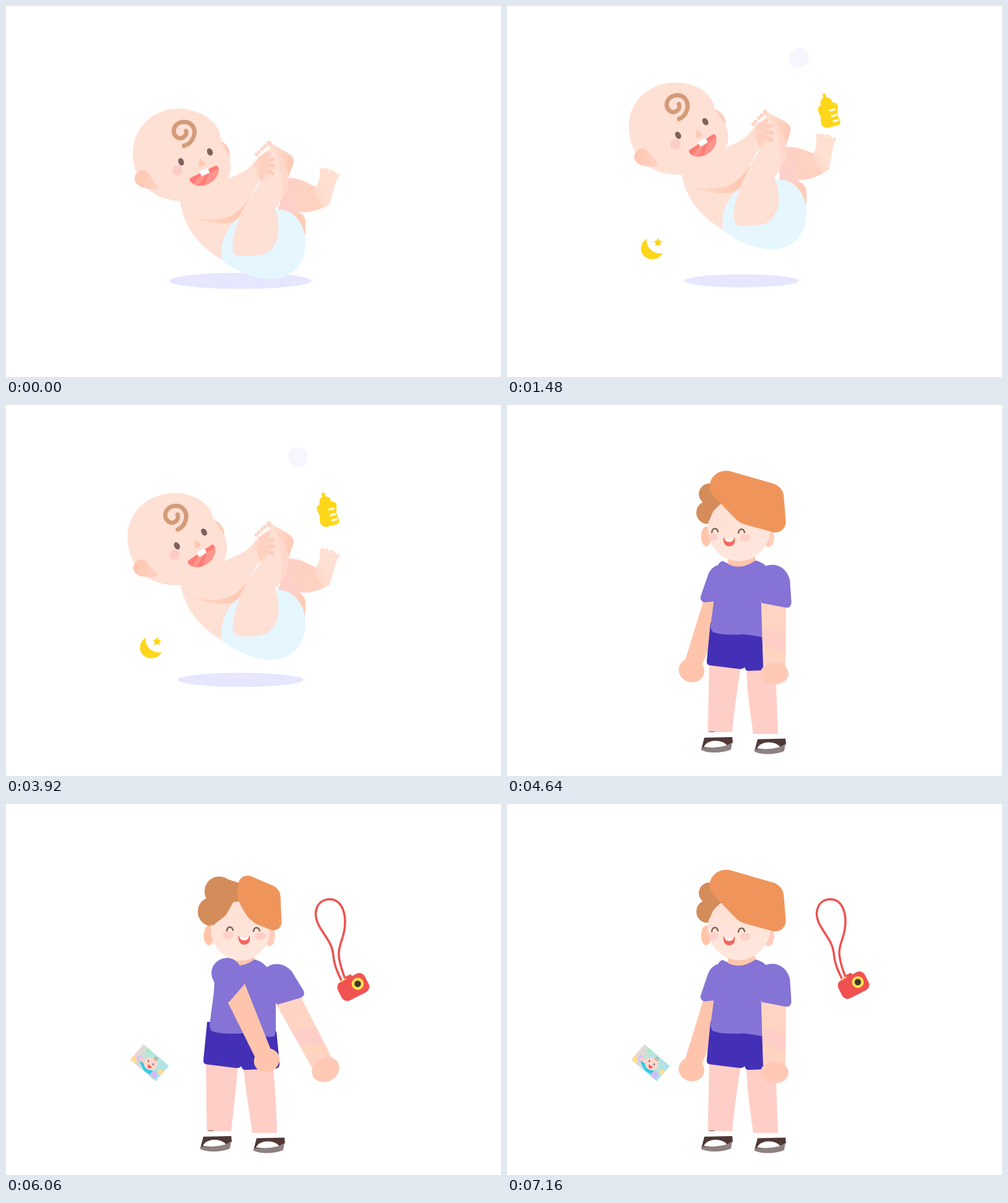
These frames come from a looping animation (800 by 600 pixels, 7.18 s). An HTML page with a canvas:

```html
<!DOCTYPE html>
<html lang="en">
<head>
<meta charset="utf-8">
<title>Growing up</title>
<style>
html, body { margin: 0; width: 100%; height: 100%; overflow: hidden; background: #fff; }
canvas { display: block; width: 800px; height: 600px; }
</style>
</head>
<body>
<canvas id="stage" width="800" height="600"></canvas>
<script>
const ctx = document.getElementById('stage').getContext('2d');
const LOOP = 7180, SWITCH = 4500, TAU = Math.PI * 2;
const SKIN = '#ffe0d5', PEACH = '#ffccb8', YELLOW = '#ffd619';

const clamp = v => Math.max(0, Math.min(1, v));
const mix = (a, b, k) => a + (b - a) * k;
const smooth = v => { v = clamp(v); return v * v * (3 - 2 * v); };
const wave = (t, period) => (1 - Math.cos(TAU * t / period)) / 2;
const bump = (t, mid, half) => {
  const d = Math.abs(t - mid) / half;
  return d < 1 ? (1 + Math.cos(Math.PI * d)) / 2 : 0;
};

function fill(d, color) {
  ctx.fillStyle = color;
  ctx.fill(new Path2D(d));
}
function line(d, color, width) {
  ctx.strokeStyle = color;
  ctx.lineWidth = width;
  ctx.lineCap = ctx.lineJoin = 'round';
  ctx.stroke(new Path2D(d));
}
function oval(x, y, rx, ry, color, turn = 0) {
  ctx.fillStyle = color;
  ctx.beginPath();
  ctx.ellipse(x, y, rx, ry, turn, 0, TAU);
  ctx.fill();
}
function box(x, y, w, h, r, color) {
  ctx.fillStyle = color;
  ctx.beginPath();
  ctx.roundRect(x, y, w, h, r);
  ctx.fill();
}
function blend(x0, y0, x1, y1, ...colors) {
  const g = ctx.createLinearGradient(x0, y0, x1, y1);
  colors.forEach((c, i) => g.addColorStop(i / (colors.length - 1), c));
  return g;
}
function group(draw, dx = 0, dy = 0) {
  ctx.save();
  ctx.translate(dx, dy);
  draw();
  ctx.restore();
}
// Rotate (degrees) and scale around a point.
function about(x, y, deg, scale, draw) {
  ctx.save();
  ctx.translate(x, y);
  ctx.rotate(deg * Math.PI / 180);
  ctx.scale(scale, scale);
  ctx.translate(-x, -y);
  draw();
  ctx.restore();
}

// ---------- baby ----------
function farLeg() {
  fill('M440 290L455 278C472 277 488 286 503 294L524 320C505 332 485 336 466 332L445 345Z', blend(440, 310, 500, 310, '#ffcfc8', '#ffd2c0'));
  fill('M508 266L538 274C532 285 529 303 524 317C521 324 515 325 511 323L497 299C504 290 508 280 508 266Z', blend(500, 312, 520, 302, '#ffd8c8', '#ffe0d2'));
  [[511, 266, 4], [518, 266.5, 3.4], [525, 268, 3.1], [530, 271, 2.8], [536, 274, 2.7]]
    .forEach(([x, y, r]) => oval(x, y, r, r + .8, '#ffdfd0', .3));
}
function torso() {
  fill('M468 332C485 336 487 346 482 378L450 350Z', '#ffcdb8');
  fill('M440 325L458 302Q468 320 473 336L440 340Z', '#ffcfca');
  fill('M281 310C285 352 306 386 352 412L385 360L397 308L350 296Z', SKIN);
  fill('M297 338C318 351 350 355 372 348L394 310L388 308C378 336 340 346 297 338Z', blend(300, 345, 385, 325, '#ffd9ca', '#ffc7ae'));
  fill('M348 395C350 370 362 354 373 345L436 329C465 327 484 352 484 385C483 420 460 442 428 442C400 442 365 425 349 411Q348 403 348 395Z', '#e5f6ff');
}
function nearLeg() {
  fill('M424 221Q428 219 432 224C446 233 460 238 464 246C467 254 461 262 456 279L436 262Z', blend(430, 240, 465, 250, '#ffdccf', '#ffc8b4'));
  fill('M412 283C400 304 372 342 367 380C365 398 368 404 382 404C402 405 420 403 427 395C441 382 441 366 440 350Q439 338 435 329C451 306 458 294 456 272C452 258 442 242 432 227L412 240Z', SKIN);
  fill('M433 229C447 245 457 262 456 278Q455 292 446 311C448 280 444 255 433 229Z', '#ffd8cb');
  [[425, 222, 4], [419, 227, 3.5], [414, 231, 3], [409, 236, 3], [405, 240, 3]]
    .forEach(([x, y, r]) => oval(x, y, r, r, '#ffd6c8'));
}
function arm() {
  fill('M281 316L356 281C374 272 388 268 395 259L410 243L414 281C407 286 403 294 400 301C388 321 374 338 352 343C330 347 308 345 290 335Z', SKIN);
  const tone = blend(404, 255, 436, 262, '#ffd5c6', '#ffc9b7');
  fill('M397 261L409 243Q423 236 428 248Q437 259 427 271L413 283C406 280 409 262 397 261Z', blend(396, 258, 428, 262, SKIN, '#ffd0bf', '#ffdacd'));
  line('M411 251Q417 240 425 239M414 256Q422 247 432 248M416 263Q424 256 433 259M416 269Q424 264 431 271', tone, 5.5);
}
function babyHead() {
  fill('M344 218C355 219 365 234 361 247L349 242Z', PEACH);
  fill('M278 166C310 166 345 184 347 215C350 229 361 235 363 255C366 284 340 316 287 316C242 315 205 290 205 238C206 195 237 167 278 166Z', SKIN);
  fill('M226 266C216 263 207 272 208 281C210 292 225 296 240 297C247 296 245 289 241 287C235 280 232 270 226 266Z', blend(209, 275, 243, 290, '#ffc7b0', '#ffd1c1'));
  line('M291 202C293 211 283 217 276 212C266 204 272 188 287 187.5C301 187 308 200 303 212Q298 224 288 226', '#d49b78', 7);
  oval(283, 252, 4.4, 6.2, '#80605a', -.4);
  oval(329.5, 236, 4.4, 6.2, '#80605a', -.4);
  fill('M313 246Q315 246 322 256Q320 259 311 260Z', '#ffc9b0');
  oval(277, 266, 8.2, 8.2, '#ffcbc7');
  const mouth = 'M298 278L339 258C344 257 345 265 342 273C333 291 309 296 299 285Q295 281 298 278Z';
  fill(mouth, '#ff7d76');
  group(() => {
    ctx.clip(new Path2D(mouth));
    fill('M317 296L329 270L345 262L337 285ZM300 291L316 272L326 270L308 292Z', '#ff958d');
  });
  group(() => { ctx.rotate(-.4); box(-7.2, -4.2, 14.5, 8.5, 2, '#fff'); }, 321, 268.5);
}
function bottle() {
  line('M511 139L513 147', YELLOW, 6);
  oval(515, 154, 11.5, 11, YELLOW);
  fill('M499 165Q500 160 507 158L528 153Q536 154 537 160C538 168 535 172 538 180L542 190Q543 196 537 198L517 203Q508 203 505 195L504 182C503 175 498 172 499 165Z', YELLOW);
  line('M523 169L531 167M526 180L534 178M529 190L537 188', '#fff', 4);
}
function moon() {
  fill('M224 373C205 385 212 413 235 413C245 413 252 408 255 401C238 405 222 390 224 373Z', YELLOW);
  ctx.beginPath();
  for (let i = 0; i < 10; i++) {
    const a = i * Math.PI / 5 - Math.PI / 2, r = i % 2 ? 4.2 : 8;
    ctx.lineTo(246 + r * Math.cos(a), 380.5 + r * Math.sin(a));
  }
  ctx.closePath();
  ctx.fillStyle = ctx.strokeStyle = YELLOW;
  ctx.lineWidth = 1;
  ctx.lineJoin = 'round';
  ctx.fill();
  ctx.stroke();
}
function babyScene(t) {
  const up = wave(t, 3045);
  oval(379, 444.5, mix(115, 93, up), mix(13, 10.5, up), '#e6e6ff');
  if (t > 800) {
    const pop = t < 1080 ? 1.08 * smooth((t - 800) / 280) : mix(1.08, .83, smooth((t - 1080) / 340));
    const size = pop + .17 * bump(t, 2880, 1000);
    const r = 16 * smooth((t - 800) / 280);
    oval(472, 84, r, r, '#f6f6ff');
    about(520.5, 169, 0, size, bottle);
    about(234, 392.5, 0, size, moon);
  }
  const pull = -2.8 * wave(t, 965);
  group(() => {
    about(440, 340, -7 * wave(t, 3920), 1, farLeg);
    torso();
    about(390, 385, pull, 1, nearLeg);
    about(310, 340, pull, 1, arm);
    about(321, 303, -8.2 * wave(t, 2530), 1, babyHead);
  }, 0, -48.5 * up);
}

// ---------- boy ----------
function shoe() {
  fill('M319 538L364 537L365 546L355 554L314 557Z', '#4f3835');
  fill('M318 553C324 540 348 540 356 551Q338 556 318 553Z', '#fff');
  fill('M314 554C332 555 355 554 364 545L362 557C350 563 325 564 314 558Z', '#8e8181');
}
function leftArm() {
  fill('M-19 26L19 26L13 145L-15 145Z', '#ffc5ac');
  oval(0, 154, 21, 19, '#ffc5ac');
  fill('M-25 0C-25 -34 24 -34 24 0L18 27L-16 43Q-26 43 -25 32Z', '#8573d6');
}
function rightArm(stretch) {
  group(() => {
    ctx.scale(1, stretch);
    fill('M-20 30L20.5 30L18 148L-18 148Z', '#ffd4c4');
    fill('M-19 82L19 95L18 126L-18.5 105Z', '#ffcec8');
    fill('M-18.5 110L18 125L18 138L-18 122Z', '#ffd5bd');
    oval(0, 159, 23, 18.5, '#ffc9b6');
  });
  fill('M-30 -10C-14 -30 18 -32 27 0L29 37Q28 46 20 45L-19 37Z', '#8573d6');
}
function place(draw, x, y, deg) {
  group(() => { ctx.rotate(-deg * Math.PI / 180); draw(); }, x, y);
}
// Each point: x, y facing left, then x, y facing right.
function morph(points, h) {
  return points.map(([a, b, c, d]) => [mix(a, c, h), mix(b, d, h)]);
}
function rounded(points, radius, color) {
  const n = points.length, last = points[n - 1];
  ctx.beginPath();
  ctx.moveTo((last[0] + points[0][0]) / 2, (last[1] + points[0][1]) / 2);
  points.forEach((p, i) => {
    const q = points[(i + 1) % n];
    ctx.arcTo(p[0], p[1], q[0], q[1], radius[i]);
  });
  ctx.closePath();
  ctx.fillStyle = color;
  ctx.fill();
}
const FRINGE = [[339, 101, 380, 110], [446, 131.5, 443, 137], [452.5, 212, 446, 211],
  [376, 191, 395, 190], [323, 136, 372, 150]];
const SIDE = [[327, 127, 345, 117], [365, 130, 378, 128], [355, 160, 378, 158], [345, 160, 368, 158],
  [333, 172, 356, 180], [325, 192, 333, 198], [320, 160, 320, 160]];

function boyHead(h) {
  const hair = '#d48c5a', dx = 26.5 * h;
  fill('M357 246L401 246L401 252Q377 268 357 257Z', '#ffc5ac');
  oval(322 + 6 * h, 212.5, 8.5, 16, '#ffc5a8');
  oval(423 + 3 * h, 213, 9, 17, '#ffcdbb');
  oval(mix(327, 345, h), mix(144, 141, h), mix(17, 24, h), mix(17, 24, h), hair);
  oval(mix(323, 334, h), 174, mix(17, 24, h), mix(18, 24, h), hair);
  oval(375 + 4 * h, 200 + h, 50.5 - 2.5 * h, 52.5, blend(350, 170, 370, 252, '#ffe0d5', '#ffe7dd'));
  group(() => {
    oval(333, 213.5, 7.5 + 1.5 * h, 6, '#ffcfc8');
    oval(385, 214.5, 9, 6, '#ffcfc8', -.15);
    line('M331 206C332 198 339 198 341 205M374 207C375 199 382 199 384 206', '#806452', 2.5);
    fill('M349.5 214Q359 222 368 214Q370 228 359 228.5Q349 228 349.5 214Z', '#f5665e');
    fill('M351 214.5Q359 221 367 214.5Q366 221 359 221.5Q352 221 351 214.5Z', '#fff');
  }, dx, -h);
  rounded(morph(SIDE, h), [3, 3, 2, 6, 14, 2, 4], hair);
  rounded(morph(FRINGE, h), [mix(27, 15, h), mix(24, 20, h), mix(17, 13, h), mix(36, 45, h), mix(24, 45, h)], '#ef955c');
}
function camera(t) {
  const peak = bump(t, 5450, 800);
  const size = t < 5200 ? 1.09 * smooth((t - 4900) / 260) : 1 + .158 * peak;
  const red = `rgb(${mix(240, 250, peak)},${mix(80, 106, peak)},${mix(80, 106, peak)})`;
  about(499, 152, 0, size, () => {
    line('M541 282C530 260 529 250 528 240C525 215 500 200 500.5 176C502 160 512 154 524 154C540 155 547 172 547 190C547 215 538 220 537 240C537 255 543 268 547 280', '#ef5250', 3.5);
    group(() => {
      ctx.rotate(-.47);
      box(-24, -16.5, 48, 33, 10, red);
      box(-7, -20, 13, 10, 3, red);
    }, 560, 293);
    line('M541 284L543 283M546 281L548 280', '#ffe05a', 2);
    oval(567, 288, 9.6, 9.6, '#ffe24f');
    oval(567, 288, 5.2, 5.2, '#41362d');
  });
}
function photo(t) {
  const size = t < 5180 ? 1.14 * smooth((t - 4900) / 260) : 1 + .14 * (1 - smooth((t - 5400) / 650));
  about(232, 418.5, 0, size, () => {
    group(() => {
      ctx.rotate(.706);
      ctx.fillStyle = blend(-27, 10, 24, -12, '#f8d2cc', '#b5e6e2', '#aee2e8');
      ctx.fillRect(-27, -16.5, 54, 33);
      ctx.beginPath();
      ctx.rect(-27, -16.5, 54, 33);
      ctx.clip();
      ctx.rotate(-.706);
      ctx.translate(-232, -418.5);
      oval(208, 413, 5, 5, '#ffdf85');
      oval(216, 412, 5.5, 6, '#d5c7f0');
      oval(231, 400, 4.5, 3, '#a3edbd', .7);
      oval(250, 433, 4.5, 4.5, '#ffdc90');
      line('M220 418L226 429L234 434', '#2fcbe4', 7);
      line('M217 412L222 417', '#ffd0c2', 4);
      oval(234, 420, 11, 10.5, '#ffd8cd');
      oval(239, 438, 6, 6, '#cdbef2');
      line('M239 413Q241 408 244 411Q245 415 241 414', '#b48062', 1.2);
      oval(230, 416, 1.2, 1.4, '#6b514c');
      oval(238, 421, 1.2, 1.4, '#6b514c');
      fill('M229 421L236 425Q232 430 229 426Z', '#f0605c');
    }, 232, 418.5);
    line('M203 425L207 428M259 409L263 412', '#f0f8f8', 1);
  });
}
function boyScene(t) {
  const swing = Math.cos(TAU * (t - 5900) / 2800);
  const h = bump(t, 6110, 530);
  const left = 2.9 + 23 * swing, front = left > 12;
  const lean = -2 * swing;
  const drawLeft = () => place(leftArm, 353 + 5 * swing, 279 - 5 * swing, left);
  if (!front) drawLeft();
  fill(`M${325 + lean} 415L324.5 529L364 529C368 490 373 450 ${377 + lean} 418Z`, '#ffcec6');
  fill(`M${385 + lean} 420C388 470 394 500 398 532L438 532C437 490 434 450 ${433 + lean} 420Z`, '#ffcec6');
  line('M327 528.5L335 528.5', '#665751', 1);
  shoe();
  group(shoe, 86, 2.5);
  group(() => {
    fill('M327 352L321 413Q320 420 326 421L374 427Q380 427 382 424Q384 430 388 430L438 428Q444 427 444 420L439 368Z', '#4330b6');
  }, lean, 0);
  fill('M348 252Q377 268 401 251Q413 254 421 263L436 290L436 350Q437 374 433 376C415 378 400 372 382 371Q350 373 335 368Q329 366 329 357L336 304L338 268Q340 256 348 252Z', '#8573d6');
  boyHead(h);
  if (front) drawLeft();
  place(() => rightArm(1 + .05 * swing), 434 + 4 * swing, 283, 14.6 + 14.6 * swing);
  if (t > 4900) {
    camera(t);
    photo(t);
  }
}

function draw(t) {
  ctx.fillStyle = '#fff';
  ctx.fillRect(0, 0, 800, 600);
  if (t < SWITCH) babyScene(t);
  else boyScene(t);
}
const start = performance.now();
function tick() {
  draw((performance.now() - start) % LOOP);
  requestAnimationFrame(tick);
}
tick();
</script>
</body>
</html>
```
